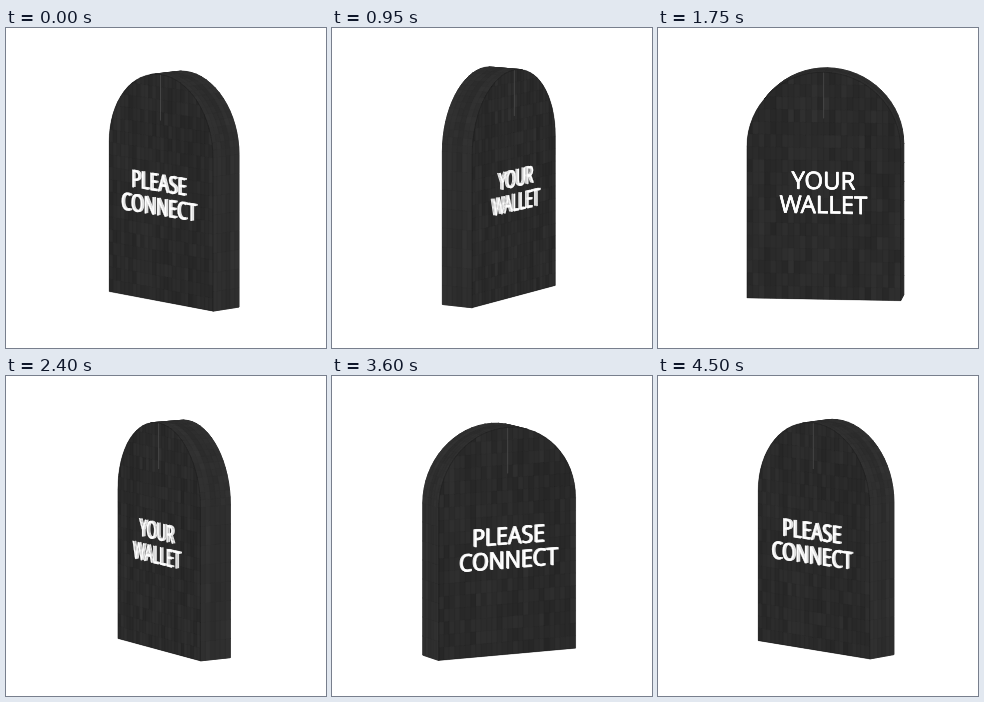
Recreate the animation shown at these times as an HTML page with a canvas. Size 320 by 320 pixels, loop 4550 ms.

```html
<!DOCTYPE html>
<html lang="en">
<head>
<meta charset="utf-8">
<title>Turning headstone</title>
<style>
  html, body { margin: 0; width: 100%; height: 100%; overflow: hidden; background: #fff; }
  canvas { display: block; width: 100vw; height: 100vh; }
</style>
</head>
<body>
<canvas id="stage" width="320" height="320"></canvas>
<script>
const ctx = document.getElementById('stage').getContext('2d');
const LOOP = 4550, STEP = 50;
const CX = 167.5, CY = 160;            // centre of the view
const W = 77, H = 17.6;                // half width, half thickness
const TOP = 45, SPRING = 120, BOTTOM = 271.3;
const PITCH = 0.15, DEPTH = 5000, BOB = 4.5, START = 47.6;
const LANES = 6, TEXT_DEPTH = 3;
const FACES = [['PLEASE', 'CONNECT'], ['YOUR', 'WALLET']];

const hash = n => {
  const v = Math.sin(n * 12.9898 + 4.1) * 43758.5453;
  return v - Math.floor(v);
};
const grey = v => {
  const n = Math.round(v);
  return `rgb(${n},${n},${n})`;
};

// Outline from bottom left, over the arch, to bottom right.
const outline = [];
for (let i = 0; i < 8; i++) outline.push([-W, BOTTOM + (SPRING - BOTTOM) * i / 8]);
for (let i = 0; i <= 32; i++) {
  const t = Math.PI * i / 32;
  outline.push([-W * Math.cos(t), SPRING - (SPRING - TOP) * Math.sin(t)]);
}
for (let i = 1; i <= 8; i++) outline.push([W, SPRING + (BOTTOM - SPRING) * i / 8]);

function projector(angle, bob) {
  const c = Math.cos(angle), s = Math.sin(angle);
  return (x, y, z) => {
    const X = x * c - z * s, Z = x * s + z * c;
    return [CX + X * (1 + Z / DEPTH), y + bob + Z * (PITCH + (y - CY) / DEPTH)];
  };
}

function trace(points) {
  ctx.beginPath();
  points.forEach(([x, y], i) => i ? ctx.lineTo(x, y) : ctx.moveTo(x, y));
  ctx.closePath();
}

function patch(points, shade, line) {
  trace(points);
  ctx.fillStyle = ctx.strokeStyle = grey(shade);
  ctx.lineWidth = line;
  ctx.fill();
  ctx.stroke();
}

function drawRim(project) {
  const strips = [];
  for (let i = 0; i < outline.length - 1; i++) {
    const [a, b] = [outline[i], outline[i + 1]];
    const quad = (z0, z1) =>
      [project(...a, z0), project(...b, z0), project(...b, z1), project(...a, z1)];
    const q = quad(H, -H);
    const cross = (q[1][0] - q[0][0]) * (q[2][1] - q[1][1])
                - (q[1][1] - q[0][1]) * (q[2][0] - q[1][0]);
    if (cross < 0) strips.push({ i, q, quad });
  }
  strips.forEach(({ q }) => patch(q, 46, 0.8));
  strips.forEach(({ i, quad }) => {
    for (let k = 0; k < LANES; k++) {
      const z = H - 2 * H * k / LANES;
      patch(quad(z, z - 2 * H / LANES), 42 + 5 * hash(k + 3) + 4 * hash(i * 7 + k), 0.4);
    }
  });
}

function drawFace(project, words, seed) {
  if (project(1, CY, H)[0] <= project(0, CY, H)[0]) return;
  const shape = outline.map(([x, y]) => project(x, y, H));

  ctx.save();
  trace(shape);
  ctx.fillStyle = grey(42);
  ctx.fill();
  ctx.clip();
  const cols = 26, rows = 18;
  for (let c = 0; c < cols; c++) {
    const x0 = -W + 2 * W * c / cols, x1 = x0 + 2 * W / cols;
    for (let r = 0; r < rows; r++) {
      const y0 = TOP + (BOTTOM - TOP) * r / rows, y1 = y0 + (BOTTOM - TOP) / rows;
      patch([project(x0, y0, H), project(x1, y0, H), project(x1, y1, H), project(x0, y1, H)],
            37 + 4 * hash(c + seed) + 8 * hash(c * 31 + r * 5 + seed), 0.4);
    }
  }
  // Seam below the crown
  ctx.strokeStyle = 'rgba(100,100,100,.5)';
  ctx.lineWidth = 1;
  ctx.beginPath();
  ctx.moveTo(...project(0, TOP, H));
  ctx.lineTo(...project(0, TOP + 46, H));
  ctx.stroke();
  ctx.restore();

  ctx.strokeStyle = 'rgba(20,20,20,.4)';
  ctx.lineWidth = 0.8;
  trace(shape);
  ctx.stroke();

  drawText(project, words);
}

function drawText(project, words) {
  ctx.save();
  ctx.font = '24px "Open Sans", "Noto Sans", sans-serif';
  ctx.textAlign = 'center';
  ctx.lineWidth = 0.5;
  for (let d = 0; d <= TEXT_DEPTH; d++) {
    const z = H + d, front = d === TEXT_DEPTH;
    const o = project(0, CY, z);
    const l = project(-40, CY, z), r = project(40, CY, z);
    const t = project(0, CY - 40, z), b = project(0, CY + 40, z);
    ctx.setTransform((r[0] - l[0]) / 80, (r[1] - l[1]) / 80,
                     (b[0] - t[0]) / 80, (b[1] - t[1]) / 80, o[0], o[1]);
    ctx.fillStyle = ctx.strokeStyle = front ? '#fff' : '#e4e4e4';
    words.forEach((word, i) => {
      const y = 1.2 + 24 * i;
      ctx.fillText(word, 0, y);
      if (front) ctx.strokeText(word, 0, y);
    });
  }
  ctx.restore();
}

function draw(now) {
  const time = Math.floor((now % LOOP) / STEP) * STEP;
  const turn = 2 * Math.PI * time / LOOP;
  const angle = START * Math.PI / 180 + turn;
  const bob = -BOB * Math.sin(turn);

  ctx.fillStyle = '#fff';
  ctx.fillRect(0, 0, 320, 320);
  ctx.lineJoin = 'round';
  drawRim(projector(angle, bob));
  FACES.forEach((words, i) => drawFace(projector(angle + Math.PI * i, bob), words, 50 * i));
}

const began = performance.now();
function tick() {
  draw(performance.now() - began);
  requestAnimationFrame(tick);
}
tick();
</script>
</body>
</html>
```
